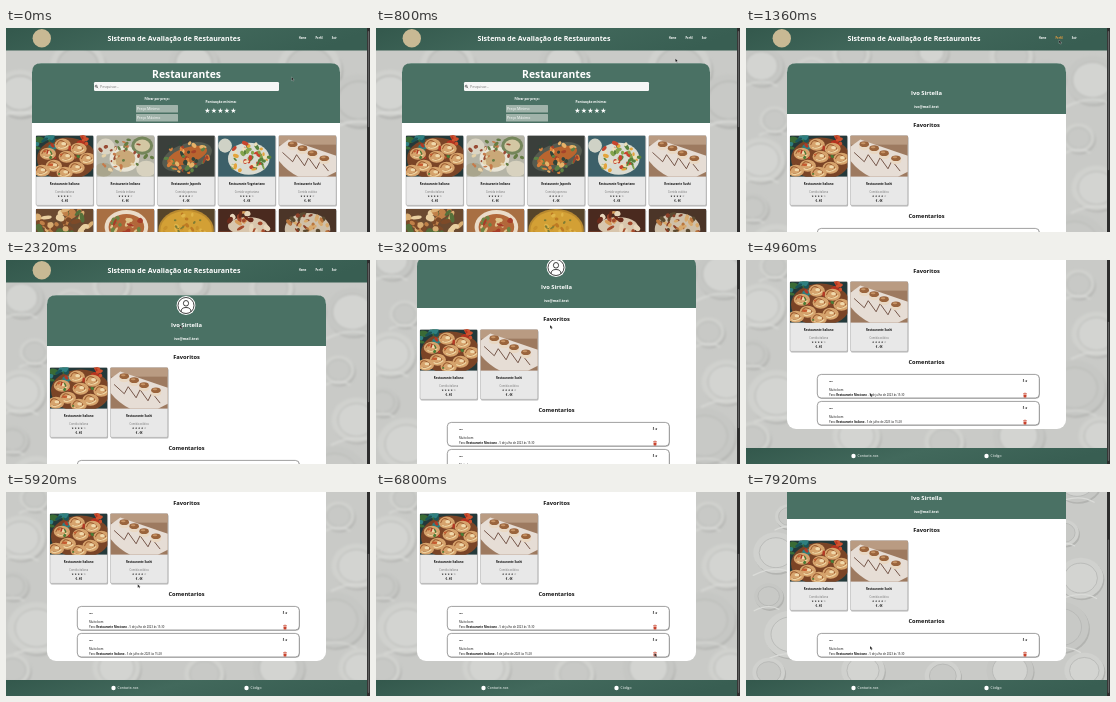
These frames come from a looping animation (364 px wide and 204 px high, 8 s). An HTML page:

```html
<!DOCTYPE html>
<html lang="pt">
<head>
<meta charset="utf-8">
<title>Avaliação de Restaurantes</title>
<style>
  html, body { margin: 0; width: 100%; height: 100%; overflow: hidden; background: #c9cac7; }
  #stage { display: block; width: 100vw; height: 100vh; }
  text { font-family: "Open Sans", "Noto Sans", sans-serif; fill: #111; }
  .b { font-weight: 700; }
  .m { text-anchor: middle; }
  .w { fill: #fff; }
  .g { fill: #777; }
  .card > .frame { stroke: #a5a5a5; stroke-width: .5; }
  .card.hover > .frame { stroke: #3c3c3c; stroke-width: .9; }
</style>
</head>
<body>
<svg id="stage" viewBox="0 0 364 204" preserveAspectRatio="none">
  <defs>
    <linearGradient id="bar" x2="1" y2=".15">
      <stop stop-color="#33584c"/><stop offset=".5" stop-color="#42695c"/><stop offset="1" stop-color="#385e52"/>
    </linearGradient>
    <filter id="soft"><feGaussianBlur stdDeviation=".8"/></filter>
  </defs>
  <g id="home"></g>
  <g id="profile"></g>
  <rect x="361" width="3" height="204" fill="#2d2d2d"/>
  <rect id="thumb" x="361.8" width="1.4" rx=".7" fill="#606060"/>
  <path id="cursor" d="M0 0V3.6L.9 2.8L1.6 4.2L2.3 3.8L1.6 2.5H2.7Z" fill="#111" stroke="#fff" stroke-width=".25"/>
</svg>
<script>
const LOOP = 8000, VIEW = 204, MID = 180.5, GREEN = '#4a7164';
const PAGE_SWITCH = 1360, AVATAR_SHOWN = 1440, DELETED = 7040;
const PROFILE_HEIGHT = 290, HOME_HEIGHT = 420, COMMENT_STEP = 27, PANEL_TOP = 35.3;
const $ = id => document.getElementById(id);

// Drawing helpers
const rect = (x, y, w, h, fill, rx = 0, extra = '') =>
  `<rect x="${x}" y="${y}" width="${w}" height="${h}" rx="${rx}" fill="${fill}" ${extra}/>`;
const oval = (x, y, rx, ry, fill, extra = '') =>
  `<ellipse cx="${x}" cy="${y}" rx="${rx}" ry="${ry}" fill="${fill}" ${extra}/>`;
const line = (d, stroke, width) =>
  `<path d="${d}" fill="none" stroke="${stroke}" stroke-width="${width}" stroke-linecap="round"/>`;
const text = (x, y, size, cls, str) =>
  `<text x="${x}" y="${y}" font-size="${size}" class="${cls}">${str}</text>`;

function random(seed) {
  return () => (seed = (seed * 16807) % 2147483647) / 2147483647;
}

function bits(seed, count, colors, cx, cy, spread, size) {
  const rnd = random(seed * 7919);
  let out = '';
  for (let i = 0; i < count; i++) {
    const angle = rnd() * 6.283, reach = Math.sqrt(rnd());
    const x = cx + Math.cos(angle) * reach * spread, y = cy + Math.sin(angle) * reach * spread * .7;
    out += oval(x, y, size * (.5 + rnd()), size * (.4 + rnd() * .5), colors[i % colors.length],
      `transform="rotate(${rnd() * 180} ${x} ${y})"`);
  }
  return out;
}

// Dishes on a 58 x 41 picture
const roll = ([x, y]) => oval(x, y, 8.2, 6, '#d6a36c') +
  line(`M${x - 6} ${y}q2-6 7-3t2 5t-6 1`, '#9c5c30', 1) + line(`M${x - 4} ${y + 3}q5 2 9-2`, '#efd3a0', 1.4) +
  oval(x + 1, y - 1, 2.4, 1.6, '#f0d9ac');
const sushi = ([x, y]) => oval(x, y + 2, 5.5, 3.6, '#e9d8c3') + oval(x, y - .5, 4.8, 2.8, '#9a643c') +
  oval(x - 1, y - 1.5, 2.3, 1, '#c79364');
const dishes = {
  pasta: () => rect(0, 0, 58, 41, '#23393a') + oval(31, 23, 30, 21, '#7a4426') +
    bits(3, 14, ['#2e7f80', '#3a6b35', '#1b5558'], 10, 8, 12, 3.5) +
    bits(4, 8, ['#b5331f', '#d0512e'], 47, 4, 10, 3.5) +
    [[27, 9], [43, 13], [12, 18], [31, 21], [52, 23], [18, 30], [41, 32], [6, 35], [29, 37]].map(roll).join('') +
    bits(8, 12, ['#b43a25', '#4c7b36', '#c65a30'], 30, 22, 25, 1.8),
  sushi: () => rect(0, 0, 58, 41, '#9d7a60') + rect(0, 0, 58, 9, '#b99b82') +
    '<path d="M0 11L10 4L58 20V36L48 41H20Q8 35 0 25Z" fill="#e6ddd5"/>' +
    line('M4 17l10 9l4-7l8 11l4-8l8 11l4-8l8 10', '#5a3527', .8) +
    [[14, 9], [24, 13], [34, 18], [46, 23]].map(sushi).join(''),
  indian: () => rect(0, 0, 58, 41, '#b5b4a6') + oval(28, 23, 15, 13, '#e8e4d6') + oval(28, 23, 11, 9, '#c9a878') +
    oval(46, 10, 11, 9, '#74865b') + oval(46, 10, 8, 6, '#d3c7a3') + oval(9, 11, 9, 8, '#dad5c4') +
    oval(50, 33, 10, 8, '#d8d2bf') + oval(7, 34, 9, 7, '#a9a58d') +
    bits(5, 40, ['#c57a4a', '#667d45', '#e6d3a9', '#994c35'], 29, 21, 27, 2),
  asian: () => rect(0, 0, 58, 41, '#3a3f3b') + oval(30, 21, 26, 13, '#555b50', 'transform="rotate(-18 30 21)"') +
    oval(30, 20, 21, 8, '#b9652f', 'transform="rotate(-18 30 20)"') +
    bits(11, 46, ['#d9803c', '#a5432a', '#5d8145', '#e6b268', '#31443a'], 30, 21, 23, 2.5),
  veggie: () => rect(0, 0, 58, 41, '#3d6069') + oval(31, 23, 21, 16, '#d9dbd2') + oval(7, 10, 7, 7, '#cfd2c6') +
    bits(17, 52, ['#58823b', '#c7442e', '#e3a43c', '#83a44d', '#ecdfba'], 31, 22, 21, 2.4),
  grill: () => rect(0, 0, 58, 41, '#6b4a30') +
    bits(19, 60, ['#d8ad72', '#c08048', '#7d4a28', '#e8cfa0', '#55703a'], 29, 18, 29, 4),
  broth: () => rect(0, 0, 58, 41, '#a86f43') + oval(30, 18, 22, 17, '#eadbc8') + oval(30, 18, 18, 13, '#b26739') +
    bits(23, 24, ['#dfc48c', '#6e8443', '#a83d29'], 30, 17, 17, 2.6),
  curry: () => rect(0, 0, 58, 41, '#57452a') + oval(29, 21, 28, 21, '#b98a30') + oval(29, 21, 26, 19, '#d3a035') +
    bits(29, 44, ['#e0b54a', '#bd7a24', '#7c7c35', '#c8922d'], 29, 20, 24, 2),
  burger: () => rect(0, 0, 58, 41, '#4a2a1f') + rect(0, 22, 58, 19, '#6f3d28') +
    oval(30, 17, 20, 9, '#d8c6ad') + bits(37, 26, ['#a4492c', '#d79c5c', '#6a2a1b', '#e7d6bb'], 30, 17, 20, 3),
  noodles: () => rect(0, 0, 58, 41, '#4b3528') + oval(29, 20, 23, 16, '#cfc0a9') +
    bits(31, 50, ['#b9763d', '#d8a96c', '#8a3f27', '#5c4a30'], 29, 19, 23, 2.6),
};

function card(x, y, name, kind, dish, id = '') {
  const cx = x + 28.7;
  return `<g class="card" id="${id}">` +
    rect(x + .5, y + .8, 57.6, 70, '#777', 1.5, 'opacity=".55"') +
    rect(x, y, 57.4, 69.8, '#e8e8e8', 1.5, 'class="frame"') +
    `<svg x="${x}" y="${y}" width="57.4" height="41.2" viewBox="0 0 58 41" preserveAspectRatio="none">${dishes[dish]()}</svg>` +
    text(cx, y + 49, 2.9, 'b m', 'Restaurante ' + name) + text(cx, y + 57, 2.6, 'm g', kind) +
    text(cx, y + 61.6, 2.6, 'm', '★ ★ ★ ★ ☆') + text(cx, y + 66.2, 2.6, 'b m', '€ - €€') + '</g>';
}

// Pale tableware; the picture covers the whole page, so it scales with its height
const plates = [
  [-165, 38, 22], [-152, 92, 15], [-166, 132, 25], [-174, 180, 16], [-150, 222, 29], [-174, 264, 18],
  [166, 52, 27], [152, 110, 16], [170, 160, 25], [148, 214, 31], [174, 262, 22],
  [-75, 26, 19], [5, 24, 17], [85, 28, 22], [-115, 45, 18], [119, 50, 20], [-70, 262, 24], [18, 268, 20], [92, 262, 26],
];
const plate = ([x, y, r], i) =>
  oval(x + 1.2, y + 1.8, r, r * .9, '#b3b4b1') + oval(x, y, r, r * .9, i % 3 ? '#d0d1ce' : '#c6c7c4') +
  oval(x, y, r * .74, r * .66, i % 2 ? '#c8c9c6' : '#d3d4d1', 'stroke="#b6b7b4" stroke-width=".9"') +
  line(`M${x - r} ${y + r}q${r} ${-r * .5} ${r * 1.7} ${-r * .1}`, '#dadbd8', 1.4);
const backdrop = id => rect(0, 0, 361, 440, '#c9cac7') +
  `<g id="${id}" filter="url(#soft)">` + plates.map(plate).join('') + '</g>';
const placeBackdrop = (id, height) =>
  $(id).setAttribute('transform', `translate(${MID}) scale(${height / PROFILE_HEIGHT})`);

const header = id => rect(0, 0, 361, 22.5, 'url(#bar)') + oval(35.8, 10.3, 9.2, 9.2, '#c8b994') +
  text(168, 13.4, 7.03, 'b m w', 'Sistema de Avaliação de Restaurantes') +
  text(296.5, 11.2, 2.6, 'b m w', 'Home') + `<g id="${id}">${text(313, 11.2, 2.7, 'b m', 'Perfil')}</g>` +
  text(328.3, 11.2, 2.6, 'b m w', 'Sair');

const panel = (x, right, bottom, greenEnd, id) =>
  rect(x, PANEL_TOP, right - x, bottom - PANEL_TOP, '#fff', 9, `id="${id}"`) +
  `<path d="M${x} ${greenEnd}V${PANEL_TOP + 9}q0-9 9-9H${right - 9}q9 0 9 9V${greenEnd}Z" fill="${GREEN}"/>`;

const trash = (x, y) =>
  `<path d="M${x - 2} ${y - 1.6}h4v.7h-4zM${x - .7} ${y - 2.3}h1.4v.6h-1.4zM${x - 1.6} ${y - .6}h3.2l-.3 3.1h-2.6z" fill="#c9432d"/>`;

const comment = (y, place, date, id) => `<g id="${id}">` +
  rect(71.8, y + .7, 222, 23.6, '#888', 4, 'opacity=".6"') +
  rect(71.3, y, 222, 23.6, '#fff', 4, 'stroke="#777" stroke-width=".7"') +
  text(83, y + 7.8, 2.4, 'b', 'Ivo') + text(279, y + 7.8, 2.7, 'b m', '5 ★') +
  text(83, y + 16.3, 2.8, '', 'Muito bom') +
  `<text x="83" y="${y + 21.5}" font-size="2.75">Para: <tspan class="b">Restaurante ${place}</tspan> - ${date}</text>` +
  trash(279, y + 20.6) + '</g>';

const menu = [
  ['Italiano', 'Comida italiana', 'pasta'], ['Indiano', 'Comida indiana', 'indian'],
  ['Japonês', 'Comida japonesa', 'asian'], ['Vegetariano', 'Comida vegetariana', 'veggie'],
  ['Sushi', 'Comida asiática', 'sushi'], ['Grelhados', 'Comida grelhada', 'grill'],
  ['Chinês', 'Comida chinesa', 'broth'], ['Tailandês', 'Comida tailandesa', 'curry'],
  ['Americano', 'Comida rápida', 'burger'], ['Mexicano', 'Comida mexicana', 'noodles'],
];

$('home').innerHTML = backdrop('homeBack') + header('homeLink') + panel(26, 334, 420, 95, 'homePanel') +
  text(MID, 49.8, 10.35, 'b m w', 'Restaurantes') +
  rect(88, 54, 185, 9, '#f6f7f6', 1.2) + oval(90.2, 58.2, 1, 1, 'none', 'stroke="#111" stroke-width=".5"') +
  line('M91 59l.8.9', '#111', .5) + text(94, 59.9, 3.6, 'g', 'Pesquisar...') +
  text(151, 72.3, 3, 'b m w', 'Filtrar por preço:') + text(215, 75.2, 3.2, 'b m w', 'Pontuação mínima:') +
  ['Mínimo', 'Máximo'].map((s, i) => rect(130, 77 + i * 9, 42, 7.6, '#a0b3aa', .6) +
    text(131, 82 + i * 9, 3.5, 'w', 'Preço ' + s)).join('') +
  [0, 1, 2, 3, 4].map(i => text(201.5 + i * 6.5, 84.5, 7, 'm w', '★')).join('') +
  menu.map((m, i) => card(30 + i % 5 * 60.7, i < 5 ? 107.6 : 181, ...m)).join('');

$('profile').innerHTML = backdrop('profileBack') + header('profileLink') + panel(41, 320, 255, 85.9, 'profilePanel') +
  '<g id="avatar">' + oval(MID - .5, 45.5, 9.4, 9.4, '#fff') +
  oval(MID - .5, 45.5, 8, 8, 'none', 'stroke="#151515" stroke-width=".8"') +
  oval(MID - .5, 43.3, 2.6, 2.8, 'none', 'stroke="#151515" stroke-width=".8"') +
  line('M175 51.5q0-4 5-4t5 4', '#151515', .8) + '</g>' +
  text(MID, 66.7, 5.8, 'b m w', 'Ivo Sirtella') + text(MID, 80.3, 3.6, 'b m w', 'ivo@mail.test') +
  text(MID, 98.6, 5.75, 'b m', 'Favoritos') +
  card(44, 107.6, ...menu[0], 'fav0') + card(104.4, 107.6, ...menu[4], 'fav1') +
  text(MID, 190.2, 5.65, 'b m', 'Comentarios') +
  comment(200.4, 'Mexicano', '5 de julho de 2023 às 15:30', 'first') +
  comment(200.4 + COMMENT_STEP, 'Italiano', '5 de julho de 2023 às 15:28', 'second') +
  '<g id="footer">' + rect(0, 274, 361, 16, 'url(#bar)') +
  oval(107.5, 282, 2.2, 2.2, '#fff') + text(111.5, 283.2, 3.4, 'w', 'Contacte-nos') +
  oval(240.5, 282, 2.2, 2.2, '#fff') + text(244.5, 283.2, 3.4, 'w', 'Código') + '</g>';

// Motion: keys are [time, ...values], eased between neighbours
function track(keys, t) {
  const next = keys.findIndex(k => k[0] > t);
  if (next < 0) return keys[keys.length - 1].slice(1);
  if (next === 0) return keys[0].slice(1);
  const a = keys[next - 1], b = keys[next];
  const u = (t - a[0]) / (b[0] - a[0]), e = u * u * (3 - 2 * u);
  return a.slice(1).map((v, i) => v + (b[i + 1] - v) * e);
}
const pointerKeys = [
  [480, 285.5, 49], [1120, 313, 12], [1680, 313, 12], [2240, 174, 65], [3200, 174, 65],
  [3600, 88, 100], [3750, 88, 100], [4080, 124, 133], [5000, 124, 133], [5400, 82, 78], [5760, 82, 78],
  [6250, 278.5, 134], [6500, 278.5, 161], [7460, 278.5, 161], [7860, 124, 154],
];
const scrollKeys = [[2320, 0], [2900, 38], [4130, 38], [4700, 86]];

const show = (id, on) => $(id).style.display = on ? '' : 'none';

function hoverCard(id, x, px, py) {
  const over = px > x && px < x + 57.4 && py > 107.6 && py < 177.6;
  const node = $(id), cx = x + 28.7, cy = 142.5;
  node.classList.toggle('hover', over);
  node.setAttribute('transform', over ? `translate(${cx} ${cy}) scale(1.025) translate(${-cx} ${-cy})` : '');
}

function render(t) {
  const onProfile = t >= PAGE_SWITCH, cut = t >= DELETED ? COMMENT_STEP : 0;
  const height = onProfile ? PROFILE_HEIGHT - cut : HOME_HEIGHT;
  const scroll = Math.min(track(scrollKeys, t)[0], height - VIEW);
  const [px, py] = track(pointerKeys, t);

  show('home', !onProfile);
  show('profile', onProfile);
  show('avatar', t >= AVATAR_SHOWN);
  show('second', !cut);
  $('profile').setAttribute('transform', `translate(0 ${-scroll})`);
  $('profilePanel').setAttribute('height', 255 - PANEL_TOP - cut);
  $('footer').setAttribute('transform', `translate(0 ${-cut})`);
  placeBackdrop('homeBack', HOME_HEIGHT);
  placeBackdrop('profileBack', PROFILE_HEIGHT - cut);

  hoverCard('fav0', 44, px, py + scroll);
  hoverCard('fav1', 104.4, px, py + scroll);
  const overLink = Math.abs(px - 313) < 7 && py + scroll < 16;
  for (const id of ['homeLink', 'profileLink'])
    $(id).firstChild.style.fill = overLink ? '#f0a03c' : '#fff';

  $('thumb').setAttribute('y', 3 + scroll / height * 198);
  $('thumb').setAttribute('height', VIEW / height * 198);
  $('cursor').setAttribute('transform', `translate(${px} ${py})`);
}

const start = performance.now();
(function tick() {
  render((performance.now() - start) % LOOP);
  requestAnimationFrame(tick);
})();
</script>
</body>
</html>
```
